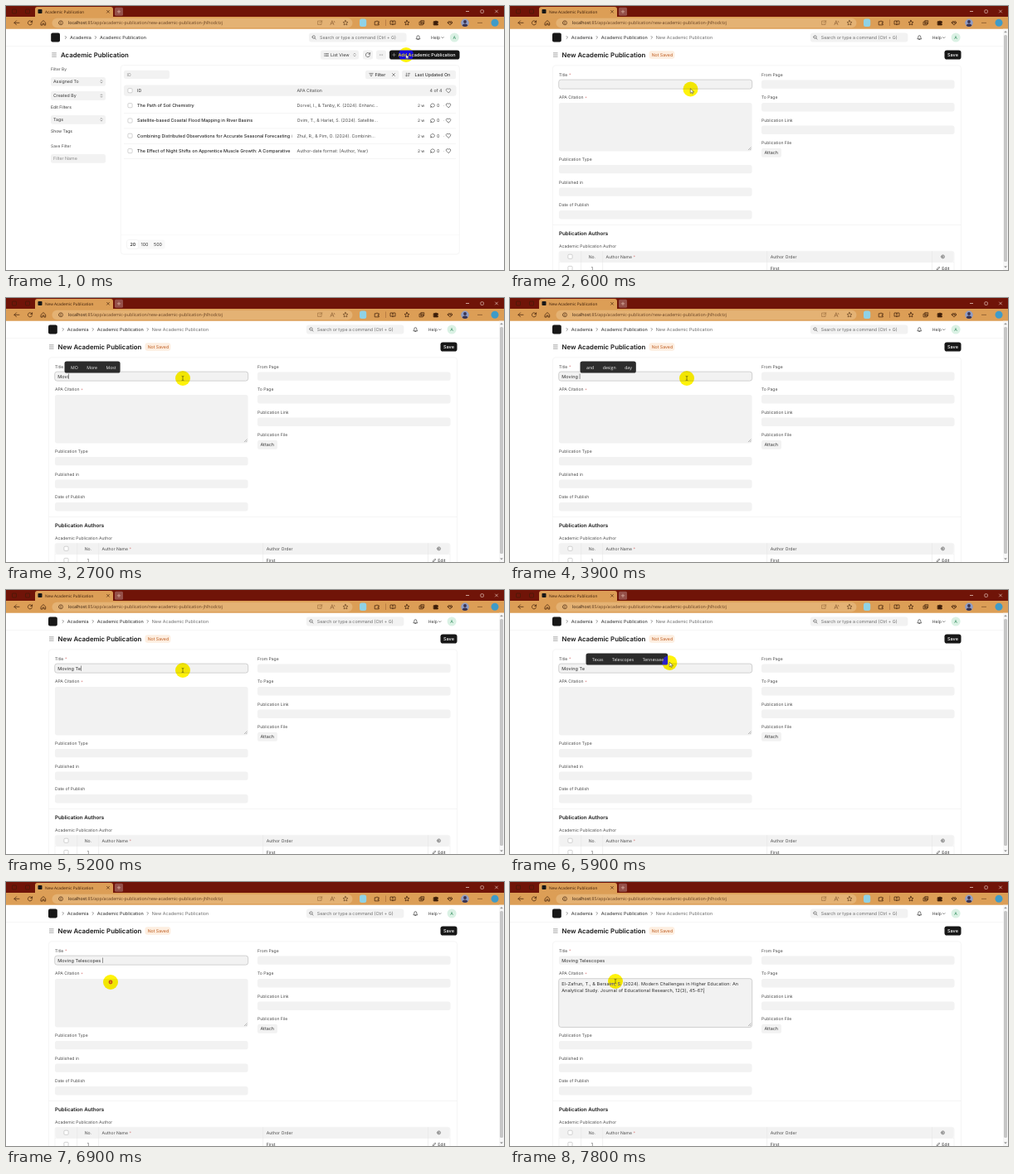
An HTML page with a canvas that plays this animation: 600 by 319 pixels, repeating every 8 s.

```html
<!DOCTYPE html>
<html lang="en">
<head>
<meta charset="utf-8">
<title>New Academic Publication</title>
<style>
html, body { margin: 0; width: 100%; height: 100%; overflow: hidden; background: #fff; }
canvas { display: block; width: 600px; height: 319px; }
</style>
</head>
<body>
<canvas id="stage"></canvas>
<script>
const LOOP = 8000, W = 600, H = 319;
const UI = 'Inter, sans-serif', SYS = '"Open Sans", sans-serif';
const INK = '#383838', MUTED = '#4c4c4c', PALE = '#8c8c8c', FIELD = '#f2f2f2', LINE = '#efefef', BLACK = '#171717';
const canvas = document.getElementById('stage');
const g = canvas.getContext('2d');
const dpr = window.devicePixelRatio || 1;
canvas.width = W * dpr;
canvas.height = H * dpr;

// ---------- helpers ----------
function setFont(size, weight = 400, family = UI, spacing = 0) {
  g.font = `${weight} ${size}px ${family}`;
  g.letterSpacing = `${spacing}px`;
  g.textRendering = 'geometricPrecision';
}

// y is the optical middle of the capitals
function text(s, x, y, size = 5.3, color = INK, weight = 400, family = UI, spacing = 0) {
  setFont(size, weight, family, spacing);
  g.fillStyle = color;
  g.fillText(s, x, y + size * 0.36);
  return g.measureText(s).width;
}

function box(x, y, w, h, fill, r = 0, stroke, lw = 0.6) {
  g.beginPath();
  g.roundRect(x, y, w, h, r);
  if (fill) { g.fillStyle = fill; g.fill(); }
  if (stroke) { g.strokeStyle = stroke; g.lineWidth = lw; g.stroke(); }
}

function dot(x, y, r, fill) {
  g.beginPath();
  g.arc(x, y, r, 0, Math.PI * 2);
  g.fillStyle = fill;
  g.fill();
}

function icon(path, x, y, color = MUTED, lw = 0.7, fill) {
  const p = new Path2D(path);
  g.save();
  g.translate(x, y);
  g.lineCap = g.lineJoin = 'round';
  if (fill) { g.fillStyle = fill; g.fill(p); }
  g.strokeStyle = color;
  g.lineWidth = lw;
  g.stroke(p);
  g.restore();
}

const hline = (x1, x2, y, color = LINE) => { g.fillStyle = color; g.fillRect(x1, y, x2 - x1, 0.6); };
const vline = (x, y1, y2, color = LINE) => { g.fillStyle = color; g.fillRect(x, y1, 0.6, y2 - y1); };

const P = {
  right: 'M-.7-1.5L.8 0L-.7 1.5',
  down: 'M-1.2-.6L0 .6L1.2-.6',
  updown: 'M-1-.8L0-1.8L1-.8M-1 .8L0 1.8L1 .8',
  menu: 'M-2.4-2.2H2.4M-2.4 0H2.4M-2.4 2.2H2.4',
  back: 'M3 0H-3M-.5-2.5L-3 0L-.5 2.5',
  reload: 'M2.4-1A2.6 2.6 0 1 0 2.5 .8M2.6-2.6V-.8H.8',
  home: 'M-2.7-.2L0-2.8L2.7-.2V2.8H.9V.8H-.9V2.8H-2.7Z',
  star: 'M0-3L.9-1L3-.8L1.4 .6L1.9 2.7L0 1.6L-1.9 2.7L-1.4 .6L-3-.8L-.9-1Z',
  cross: 'M-1.5-1.5L1.5 1.5M1.5-1.5L-1.5 1.5',
  plus: 'M-1.8 0H1.8M0-1.8V1.8',
  search: 'M-2-.5A1.7 1.7 0 1 0 1.4-.5A1.7 1.7 0 1 0-2-.5M1 .8L2.2 2.1',
  bell: 'M-2.2 1.5Q-1.5 .8-1.5-.6A1.5 1.7 0 0 1 1.5-.6Q1.5 .8 2.2 1.5ZM-.6 2.5H.6',
  heart: 'M0 2.5L-2.5 0A1.5 1.5 0 0 1 0-1.8A1.5 1.5 0 0 1 2.5 0Z',
  chat: 'M-1.4 1.6L-2.3 2.3L-2.1 .9A2.4 2.1 0 1 1-1.4 1.6Z',
  rows: 'M-2.2-1.6H2.2M-1.5 0H1.5M-.6 1.6H.6',
  list: 'M-2.3-1.5H-2M-1-1.5H2.4M-2.3 0H-2M-1 0H2.4M-2.3 1.5H-2M-1 1.5H2.4',
  sort: 'M-1.6-1.9V1.9M-2.5 1L-1.6 1.9L-.7 1M.2-1.6H2.6M.2 0H2M.2 1.6H1.3',
  book: 'M0-2.2V2.4M0-1.9Q-1.4-2.8-3-2.2V1.9Q-1.4 1.4 0 2.4Q1.4 1.4 3 1.9V-2.2Q1.4-2.8 0-1.9',
  grid: 'M-2.6-1.2H1.3V2.6H-2.6ZM-1.2-1.2V-2.6H2.7V1.2H1.3M-.7-.2V1.6M-1.6 .7H.2',
  puzzle: 'M-2.4-1.5H-.8A.8.8 0 1 1 .8-1.5H2.3V0A.8.8 0 1 0 2.3 1.4V2.6H-2.4Z',
  pulse: 'M-2.8-.2Q-2-3 0-1.3Q2-3 2.8-.2Q2.2 1.2 0 2.7Q-2.2 1.2-2.8-.2M-2.4 0H-.8L0-1L.6 .8L1 0H2.4',
  pencil: 'M-1.8 1.8L-1.5 .7L1-1.8L1.8-1L-.7 1.5Z',
  arrow: 'M0 0V5.2L1.3 4L2.2 6L3.1 5.6L2.2 3.7H4Z',
  beam: 'M-1-2.7Q0-2.7 0-2V2Q0 2.7-1 2.7M1-2.7Q0-2.7 0-2M0 2Q0 2.7 1 2.7'
};

// ---------- browser frame ----------
function browser(title) {
  const dark = '#3b1c08', bar = '#701408', tool = '#dc9e56';
  box(0, 0, W, 14, bar);
  box(35, 1, 94, 16, tool, 3);
  box(0, 13, W, 14.8, tool);
  box(7.5, 4, 5, 5, null, 1, dark);
  box(23.5, 4, 5, 5, null, 1, dark);
  box(38.5, 4, 5, 5, BLACK, 0.8);
  text(title, 47, 6.8, 4.75, dark, 400, SYS);
  icon(P.cross, 123, 6.8, dark, 0.6);
  box(131, 1.8, 10, 10, '#955049', 1.5);
  icon(P.plus, 136, 6.8, '#e6c3b4', 0.6);
  g.fillStyle = '#f2dcd4';
  g.fillRect(554, 6.3, 4, 0.7);
  box(571.8, 4.8, 3.6, 3.6, null, 0.8, '#f2dcd4');
  icon(P.cross, 591, 6.5, '#f2dcd4', 0.6);

  icon(P.back, 13, 20.3, dark);
  icon(P.reload, 29, 20.3, dark);
  icon(P.home, 45, 20.3, dark);
  box(55.5, 14.8, 362, 11.4, '#e4b274', 5.7);
  icon('M-2.5 0A2.5 2.5 0 1 0 2.5 0A2.5 2.5 0 1 0-2.5 0M0-.2V1.2M0-1.3V-1.2', 66, 20.3, dark, 0.6);
  const w = text('localhost', 75, 20.3, 5.25, '#2c170a', 400, SYS);
  text(':85/app/academic-publication/new-academic-publication-jhlhodctzj', 75 + w, 20.3, 5.25, '#664022', 400, SYS);
  icon('M0-2.2H-2.4V2.2H2V.4M.6-2.4H2.6V-.4M2.6-2.4L-.2 .4', 378, 20.3, '#96683c', 0.6);
  icon('M-2.6 2.4L-.6-2.6L1.4 2.4M-1.8 .7H.6M2-2Q3.2-.6 2-.2', 393.5, 20.3, '#85582f', 0.6);
  icon(P.star, 409, 20.3, '#5c3818', 0.6);
  box(426, 15.6, 8.2, 9.4, '#8fd2e6', 2.5);
  icon(P.puzzle, 447, 20.3, dark);
  vline(457, 16.5, 24, '#a3683a');
  icon(P.book, 466, 20.3, dark);
  icon(P.star, 483, 20.3, dark);
  icon(P.grid, 501, 20.3, dark);
  icon(P.puzzle, 518, 20.3, dark, 1, dark);
  icon(P.pulse, 535, 20.3, dark);

  g.save();
  g.beginPath();
  g.arc(553, 20.3, 4.8, 0, 7);
  g.clip();
  box(548, 15, 10, 11, '#8f9cc4');
  dot(553, 19, 1.9, '#3a3350');
  dot(553, 25, 3.6, '#3a3350');
  g.restore();
  for (const dx of [-2, 0, 2]) dot(571 + dx, 20.3, 0.55, dark);
  dot(589, 20.3, 4.5, '#3f9bc8');
}

// dx shifts the page left when the scrollbar is shown
function navbar(dx, leaf) {
  const crumb = '#454545', hint = '#6c6c6c';
  box(54.2 - dx, 32.6, 10.8, 10.8, BLACK, 2);
  icon(P.right, 72 - dx, 38, crumb, 0.6);
  text('Academia', 77 - dx, 38, 5.4, crumb, 500);
  icon(P.right, 108 - dx, 38, crumb, 0.6);
  text('Academic Publication', 113 - dx, 38, 5.42, crumb, 500);
  if (leaf) {
    icon(P.right, 174 - dx, 38, crumb, 0.6);
    text(leaf, 179 - dx, 38, 5.42, hint);
  }
  box(365 - dx, 32.6, 117.5, 10.8, FIELD, 3);
  icon(P.search, 371 - dx, 38, crumb, 0.6);
  text('Search or type a command (Ctrl + G)', 378 - dx, 38, 5.28, hint);
  icon(P.bell, 496.5 - dx, 38, INK, 0.7);
  text('Help', 512 - dx, 38, 5.1, INK);
  icon(P.down, 526 - dx, 38.2, INK, 0.6);
  dot(540.3 - dx, 38, 5.5, '#daf1e4');
  text('A', 538.5 - dx, 38, 5.2, '#2f8a5b');
  hline(0, dx ? 594 : W, 48.2);
}

// ---------- list page ----------
const rows = [
  ['The Path of Soil Chemistry', 'Dorvel, I., & Tanby, K. (2024). Enhanc…'],
  ['Satellite-based Coastal Flood Mapping in River Basins', 'Ovim, T., & Harlet, S. (2024). Satellite…'],
  ['Combining Distributed Observations for Accurate Seasonal Forecasting in M', 'Zhul, R., & Pim, O. (2024). Combinin…'],
  ['The Effect of Night Shifts on Apprentice Muscle Growth: A Comparative', 'Author-date format: (Author, Year)']
];

const checkbox = (x, y) => box(x - 2.6, y - 2.6, 5.2, 5.2, '#fff', 1.2, '#b5b5b5', 0.6);

function select(label, y) {
  box(54, y - 5.4, 66, 10.8, FIELD, 2.5);
  text(label, 57, y, 5.25);
  icon(P.updown, 115, y, MUTED, 0.5);
}

function listPage() {
  browser('Academic Publication');
  navbar(0);
  icon(P.menu, 58, 59, MUTED, 0.5);
  text('Academic Publication', 66, 59, 7.8, BLACK, 600);
  box(379, 53.5, 46, 11, FIELD, 2.5);
  icon(P.list, 386, 59, MUTED, 0.6);
  text('List View', 391, 59, 5.3, INK);
  icon(P.updown, 420, 59, MUTED, 0.5);
  box(430, 53.5, 12, 11, FIELD, 2.5);
  icon(P.reload, 436, 59, INK, 0.6);
  box(446, 53.5, 12, 11, FIELD, 2.5);
  for (const dx of [-1.7, 0, 1.7]) dot(452 + dx, 59, 0.45, INK);
  box(462, 53.5, 84.5, 11, BLACK, 2.8);
  icon(P.plus, 467.5, 59, '#bbb', 0.5);
  text('Add Academic Publication', 472.5, 59, 5.5, '#fff', 500);

  text('Filter By', 54, 76, 4.9, MUTED);
  select('Assigned To', 91.3);
  select('Created By', 108.5);
  text('Edit Filters', 54, 122, 5);
  select('Tags', 137.3);
  text('Show Tags', 54, 150.8, 5);
  text('Save Filter', 54, 169.3, 4.9, MUTED);
  box(54, 179, 66, 10.8, FIELD, 2.5);
  text('Filter Name', 57, 184.4, 5.3, PALE);

  box(138.3, 71.5, 408, 228.5, '#fff', 3.5, LINE);
  box(142, 77.7, 55, 10.4, FIELD, 2.5);
  text('ID', 145.5, 83, 5.2, PALE);
  box(433, 77.7, 40.5, 10.6, FIELD, 2.5);
  icon(P.rows, 440, 83, MUTED, 0.6);
  text('Filter', 444.5, 83, 5.3, INK, 500);
  icon(P.cross, 467, 83, MUTED, 0.6);
  box(477, 77.7, 65, 10.6, FIELD, 2.5);
  icon(P.sort, 484, 83, MUTED, 0.6);
  text('Last Updated On', 492.5, 83, 5.35, INK, 500);

  box(142, 95.5, 400.5, 13.3, FIELD, 3);
  checkbox(149.5, 102.2);
  text('ID', 158, 102.2, 5.3, MUTED, 500);
  text('APA Citation', 350.5, 102.2, 5.2, MUTED);
  text('4 of 4', 510.5, 102.2, 5.3, MUTED);
  icon(P.heart, 533, 102.3, MUTED, 0.6);
  rows.forEach(([name, cite], i) => {
    const y = 120.2 + i * 18.3;
    checkbox(149.5, y);
    g.save();
    g.beginPath();
    g.rect(142, y - 6, 202.5, 12);
    g.clip();
    text(name, 158, y, 5.42, '#2a2a2a', 500);
    g.restore();
    text(cite, 350.5, y, 5.3, MUTED);
    text('2 w', 496, y, 4.8, INK);
    icon(P.chat, 514, y, INK, 0.6);
    text('0', 519, y, 5.2, INK);
    text('·', 527, y, 5, INK);
    icon(P.heart, 533, y, INK, 0.6);
    hline(142, 542, y + 9.2);
  });
  hline(138.3, 546.3, 276.5, '#f5f5f5');
  box(145.5, 282.5, 46, 11, '#f8f8f8', 2.5);
  box(145.5, 282.5, 14, 11, '#fff', 2.5, LINE);
  text('20', 149.5, 288, 5.4, BLACK, 500);
  text('100', 162.5, 288, 5.4, INK);
  text('500', 178, 288, 5.4, INK);
}

// ---------- form page ----------
function label(s, x, y, required) {
  const w = text(s, x, y, 5.05, MUTED);
  if (required) text('*', x + w + 1.6, y + 0.4, 5.05, '#d98080');
}

function field(s, x, y, required, h = 10.4) {
  label(s, x, y, required);
  box(x, y + 6.4, 232.5, h, FIELD, 2.6);
}

const focusRing = (y, h) => box(58.7, y, 233, h, null, 2.8, '#bdbdbd', 0.7);

function formPage(state) {
  browser('New Academic Publication');
  navbar(3.2, 'New Academic Publication');
  box(594, 27.8, 6, H, '#f7f7f7');
  icon('M-1.2 .7L0-.7L1.2 .7Z', 597, 31, '#858585', 0.4, '#858585');
  box(595, 35, 4, 274, '#c6c6c6', 1.5);
  icon('M-1.2-.7L0 .7L1.2-.7Z', 597, 315.5, '#858585', 0.4, '#858585');

  icon(P.menu, 54.8, 59, MUTED, 0.5);
  text('New Academic Publication', 62.5, 59, 7.8, BLACK, 600);
  box(167.5, 54.2, 30.8, 9.6, '#fdeee0', 3);
  text('Not Saved', 170.7, 59, 5.2, '#bd5a1c');
  box(523.5, 53.5, 20, 11, BLACK, 2.8);
  text('Save', 527, 59, 5.5, '#fff', 500);

  box(51.5, 71.8, 492, 260, '#fff', 3.5, LINE);
  field('Title', 59, 83, true);
  field('APA Citation', 59, 110.6, true, 58.4);
  icon('M-2 1L1-2M0 1L1 0', 289.3, 172.8, '#777', 0.5);
  field('Publication Type', 59, 185.5);
  field('Published in', 59, 213);
  field('Date of Publish', 59, 240.6);
  field('From Page', 303, 83);
  field('To Page', 303, 110.6);
  field('Publication Link', 303, 138.1);
  label('Publication File', 303, 165.6);
  box(303, 171.8, 24, 11, FIELD, 2.6);
  text('Attach', 306.5, 177.3, 5.4, INK);

  hline(51.5, 543.5, 264);
  text('Publication Authors', 59, 275.2, 6.22, BLACK, 600);
  label('Academic Publication Author', 59, 290.4);
  box(59, 296.3, 476, 40, '#fff', 2.6, LINE);
  box(59.3, 296.6, 475.4, 12.6, FIELD, 2.4);
  hline(59, 535, 309.2);
  for (const x of [85.5, 111.5, 309.5, 508]) vline(x, 296.3, H, '#e6e6e6');
  checkbox(72.5, 302.8);
  text('No.', 94.7, 302.8, 5.15, MUTED);
  label('Author Name', 115.5, 302.8, true);
  text('Author Order', 313.7, 302.8, 5.15, MUTED);
  icon('M-2 0A2 2 0 1 0 2 0A2 2 0 1 0-2 0M-.7 0A.7 .7 0 1 0 .7 0A.7 .7 0 1 0-.7 0', 521.5, 302.9, MUTED, 0.6);
  checkbox(72.5, 317);
  text('1', 97.8, 317, 5.2);
  text('First', 313.7, 317, 5.2);
  icon(P.pencil, 516, 317, INK, 0.6);
  text('Edit', 520.2, 317, 5.2);

  if (state.inCitation) focusRing(116.7, 58.8); else focusRing(89.1, 11);
  const put = (s, y) => text(s, 62.2, y, 5.47, '#2c2c2c', 400, UI, 0.11);
  let caretX = 62.2 + put(state.typed, 94.7), caretY = 94.7;
  if (state.inCitation) {
    caretX = 62.2;
    caretY = 123;
    if (state.cited) {
      put('El-Zafrun, T., & Bersaim, S. (2024). Modern Challenges in Higher Education: An', 122.9);
      caretX += put('Analytical Study. Journal of Educational Research, 12(3), 45-67.', 131.3);
      caretY = 131.3;
    }
  }
  if (state.caret) {
    g.fillStyle = '#333';
    g.fillRect(caretX + 0.2, caretY - 3.2, 0.5, 6.4);
  }
  if (state.popup) popup(...state.popup);
}

function popup(x, ...words) {
  setFont(5.2, 400, SYS);
  const widths = words.map(s => g.measureText(s).width);
  box(x, 76.5, 2 + widths.reduce((sum, w) => sum + w + 10.5, 0), 14, '#2c2c2c', 2.6);
  let wx = x + 7.5;
  words.forEach((s, i) => {
    text(s, wx, 84.4, 5.2, '#f2f2f2', 400, SYS);
    wx += widths[i] + 10.5;
  });
}

// ---------- timeline ----------
const TITLE = 'Moving Telescopes ';
const typed = [[0, 0], [1900, 1], [2200, 2], [2500, 3], [2600, 4], [2900, 5], [3400, 6], [3700, 7],
  [4300, 8], [5200, 9], [6400, TITLE.length]];
const caret = [[0, 0], [1000, 1], [1600, 0], [1900, 1], [4200, 0], [4300, 1], [4900, 0], [5200, 1],
  [5700, 0], [6400, 1], [7500, 0], [7800, 1]];
const popups = [[0, null], [2200, [66.5, 'MO', 'MI', 'More']], [2500, null],
  [2700, [70.5, 'MO', 'More', 'Most']], [2900, null],
  [3200, [79.5, 'Moving', 'movements', 'mover']], [3600, [79.5, 'Moving', 'movements', 'movable']], [3700, null],
  [3900, [84.5, 'and', 'design', 'day']], [4500, null],
  [5400, [91.5, 'Texas', 'Telescopes', 'Tennessee']], [6400, null]];
// time, x, y
const path = [[0, 482, 59], [100, 482, 59], [300, 400, 72], [600, 217.5, 100.5], [900, 214, 98], [1300, 213, 97],
  [5500, 213, 97], [5900, 192.5, 88], [6050, 172, 75], [6250, 139, 81], [6450, 138, 82],
  [6800, 126, 121], [7000, 126, 121], [7100, 127, 120], [LOOP, 127, 120]];

function at(track, t) {
  let value = track[0][1];
  for (const [when, v] of track) if (t >= when) value = v;
  return value;
}

function pointerAt(t) {
  const i = Math.max(1, path.findIndex(p => t < p[0]));
  const [t0, x0, y0] = path[i - 1], [t1, x1, y1] = path[i];
  const k = (t - t0) / (t1 - t0);
  return [x0 + (x1 - x0) * k, y0 + (y1 - y0) * k];
}

function pointer(t) {
  const [x, y] = pointerAt(t);
  g.globalCompositeOperation = 'difference';
  dot(x, y, 9, '#000cf4');
  g.globalCompositeOperation = 'source-over';
  if (t < 700 || (t >= 5600 && t < 6700)) {
    icon(P.arrow, x - 0.2, y - 0.3, '#333', 0.5, '#fff');
  } else if (t >= 6850 && t < 7000) {
    dot(x, y, 2.4, '#c8501c');
    dot(x, y, 1.1, '#e8a010');
  } else {
    icon(P.beam, x, y, '#4a4a10', 0.6);
  }
}

function draw(t) {
  g.setTransform(dpr, 0, 0, dpr, 0, 0);
  box(0, 0, W, H, '#fff');
  if (t < 300) listPage();
  else formPage({
    typed: TITLE.slice(0, at(typed, t)),
    caret: at(caret, t),
    popup: at(popups, t),
    inCitation: t >= 7000,
    cited: t >= 7700
  });
  pointer(t);
}

function tick() {
  draw(performance.now() % LOOP);
  requestAnimationFrame(tick);
}
tick();
</script>
</body>
</html>
```
